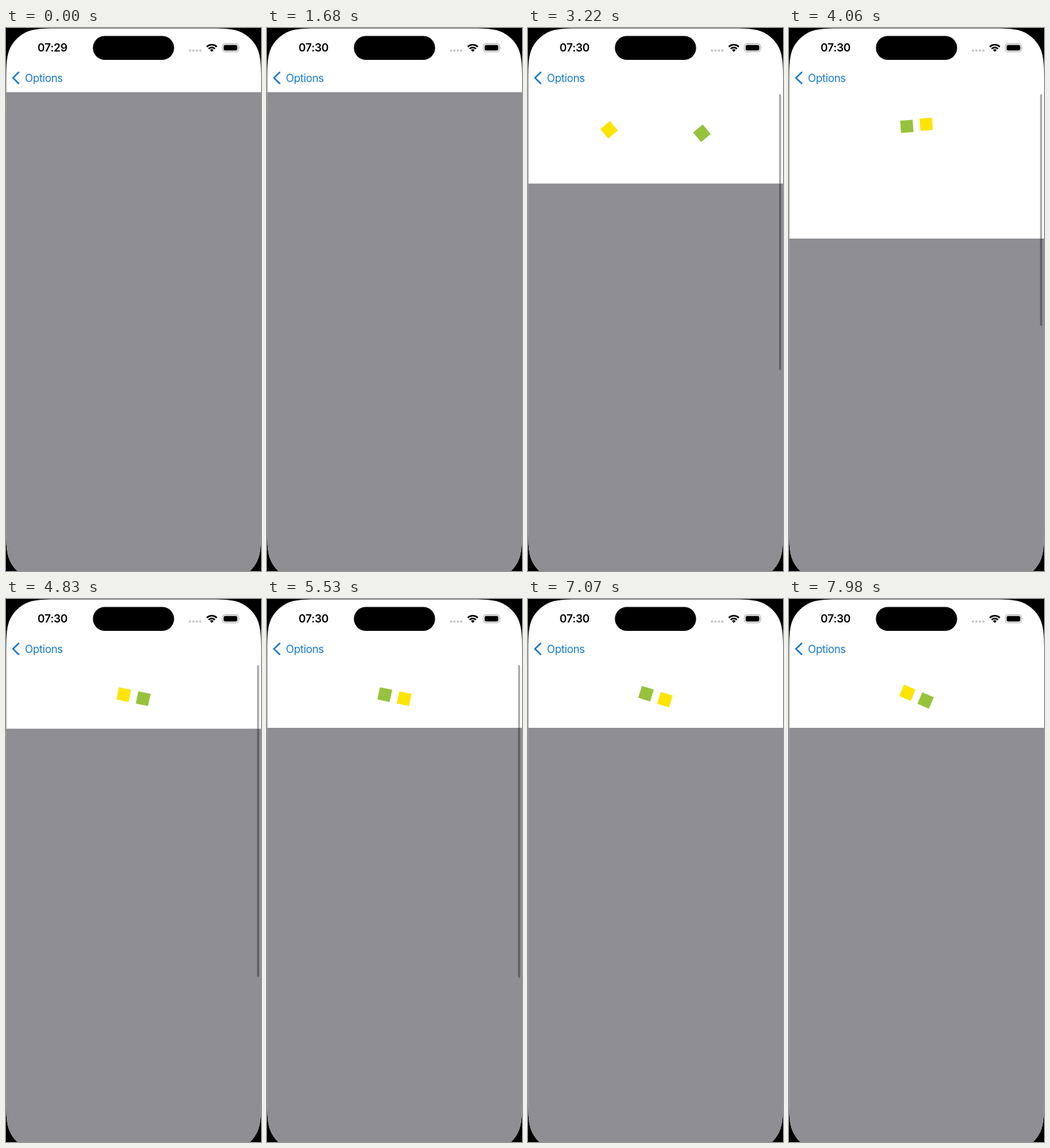
Recreate the animation shown at these times as an HTML page. Size 368 px wide and 784 px high, loop 8000 ms.

```html
<!DOCTYPE html>
<html lang="en">
<head>
<meta charset="utf-8">
<title>Pull to refresh</title>
<style>
  html, body { margin: 0; width: 100%; height: 100%; overflow: hidden; background: #000; }
  svg { display: block; width: 100%; height: 100%; }
  text { font-family: Inter, Roboto, sans-serif; letter-spacing: -.3px; }
</style>
</head>
<body>
<svg viewBox="0 0 368 784">
  <clipPath id="screen"><path id="outline"/></clipPath>
  <g clip-path="url(#screen)">
    <rect width="368" height="784" fill="#fff"/>
    <rect id="yellow" x="-9" y="-9" width="18" height="18" fill="#fde404"/>
    <rect id="green" x="-9" y="-9" width="18" height="18" fill="#97c23c"/>
    <rect id="sheet" y="93" width="368" height="720" fill="#8e8e93"/>
    <rect id="bar" x="362.4" y="95.5" width="2.8" height="480" rx="1.4" fill="#000"/>

    <text id="clock" x="45.6" y="34.4" font-size="16" font-weight="600">07:29</text>
    <rect x="125.4" y="11.4" width="117.2" height="34.6" rx="17.3"/>

    <g fill="#c9c9cb">
      <circle cx="265.6" cy="32.6" r="1.8"/><circle cx="270.5" cy="32.6" r="1.8"/>
      <circle cx="275.4" cy="32.6" r="1.8"/><circle cx="280.3" cy="32.6" r="1.8"/>
    </g>
    <g fill="none" stroke="#000" stroke-width="2.2">
      <path d="M289.8 27.1a10.2 10.2 0 0 1 14.4 0"/>
      <path d="M292.4 30a6.5 6.5 0 0 1 9.2 0"/>
    </g>
    <path d="M297 34.6l-2.7-2.8a3.8 3.8 0 0 1 5.4 0z"/>
    <rect x="312.2" y="22.7" width="23.4" height="11.6" rx="3.7" fill="none" stroke="#a6a6a8"/>
    <rect x="314" y="24.4" width="19.8" height="8.2" rx="2.3"/>
    <path d="M336.8 26.6q1.6 1.9 0 3.8z" fill="#a6a6a8"/>

    <path d="M18.2 64.2L10 72l8.2 7.8" fill="none" stroke="#147ad6" stroke-width="2.4"
      stroke-linecap="round" stroke-linejoin="round"/>
    <text x="27.2" y="77.6" font-size="15.5" fill="#147ad6">Options</text>
  </g>
</svg>
<script>
const LOOP = 8000, STEP = 70;
const RELEASE = 4290, SPIN = 4305, TURN = 700;
const TOP = 92.6, HOLD = 93.4, PULL = 220;

// time, pull distance
const drag = [[2730, 0], [2800, 20.5], [3220, 132], [3570, 172], [4060, 211.4], [4200, PULL]];
// pull distance, x, yellow y, green y, rotation
const poses = [
  [0, 8, 110, 112, -198],
  [20.5, 28, 107, 111, -174],
  [132, 117, 147, 152, -40],
  [211.4, 198, 139, 142, -4],
  [PULL, 197.7, 145.3, 136.7, 17.5]
];
// pull distance, scroll bar end
const barEnds = [[0, 589], [20.5, 574], [132, 494], [211.4, 430], [PULL, 423]];

const el = id => document.getElementById(id);
const [yellow, green, sheet, bar, clock] = ['yellow', 'green', 'sheet', 'bar', 'clock'].map(el);
const clamp = v => Math.min(1, Math.max(0, v));
const quart = p => p < .5 ? 8 * p ** 4 : 1 - 8 * (1 - p) ** 4;

// Rectangle whose corners ease smoothly into the straight sides
function smoothRect(x, y, w, h, r) {
  const half = [[1.529, 0], [1.089, 0], [.868, 0], [.631, .075], [.373, .169]];
  const corner = [...half, ...half.map(([a, b]) => [b, a]).reverse()];
  const side = (flipX, flipY) => {
    const pts = corner.map(([a, b]) =>
      `${flipX ? x + w - a * r : x + a * r} ${flipY ? y + h - b * r : y + b * r}`);
    if (flipX === flipY) pts.reverse();
    return `${pts[0]}C${pts.slice(1).join(' ')}`;
  };
  return `M${[side(0, 0), side(1, 0), side(1, 1), side(0, 1)].join('L')}Z`;
}

function lookup(rows, key) {
  let i = 1;
  while (i < rows.length - 1 && key > rows[i][0]) i++;
  const a = rows[i - 1], b = rows[i], p = clamp((key - a[0]) / (b[0] - a[0]));
  return a.slice(1).map((v, k) => v + (b[k + 1] - v) * p);
}

function pullAt(t) {
  if (t < RELEASE) return lookup(drag, t)[0];
  const k = .0122 * (t - RELEASE);
  return HOLD + (PULL - HOLD) * (1 + k) * Math.exp(-k);
}

function place(node, x, y, angle) {
  node.setAttribute('transform', `translate(${x} ${y}) rotate(${angle})`);
}

function draw(t) {
  const pull = pullAt(t);
  sheet.setAttribute('y', TOP + pull);
  clock.textContent = t < 1680 ? '07:29' : '07:30';

  const end = t < RELEASE
    ? lookup(barEnds, pull)[0]
    : 547 - 124 * (pull - HOLD) / (PULL - HOLD);
  bar.setAttribute('height', end - 95.5);
  bar.setAttribute('opacity', t < 2800 ? 0 : .35 * (1 - clamp((t - 5780) / 320)));

  if (t < SPIN) {
    const [x, yy, gy, angle] = lookup(poses, pull);
    place(yellow, x, yy, angle);
    place(green, 368 - x, gy, angle);
  } else {
    const n = (t - SPIN) / TURN, whole = Math.floor(n);
    const angle = 17.5 + 180 * (whole + quart(n - whole));
    const rad = angle * Math.PI / 180;
    const dx = 14.3 * Math.cos(rad), dy = 14.3 * Math.sin(rad);
    place(yellow, 184 + dx, 141 + dy, angle);
    place(green, 184 - dx, 141 - dy, angle);
  }
}

el('outline').setAttribute('d', smoothRect(.3, .6, 367.7, 797.5, 51.6));

const start = performance.now();
function tick() {
  const t = (performance.now() - start) % LOOP;
  draw(Math.floor(t / STEP) * STEP);
  requestAnimationFrame(tick);
}
tick();
</script>
</body>
</html>
```
